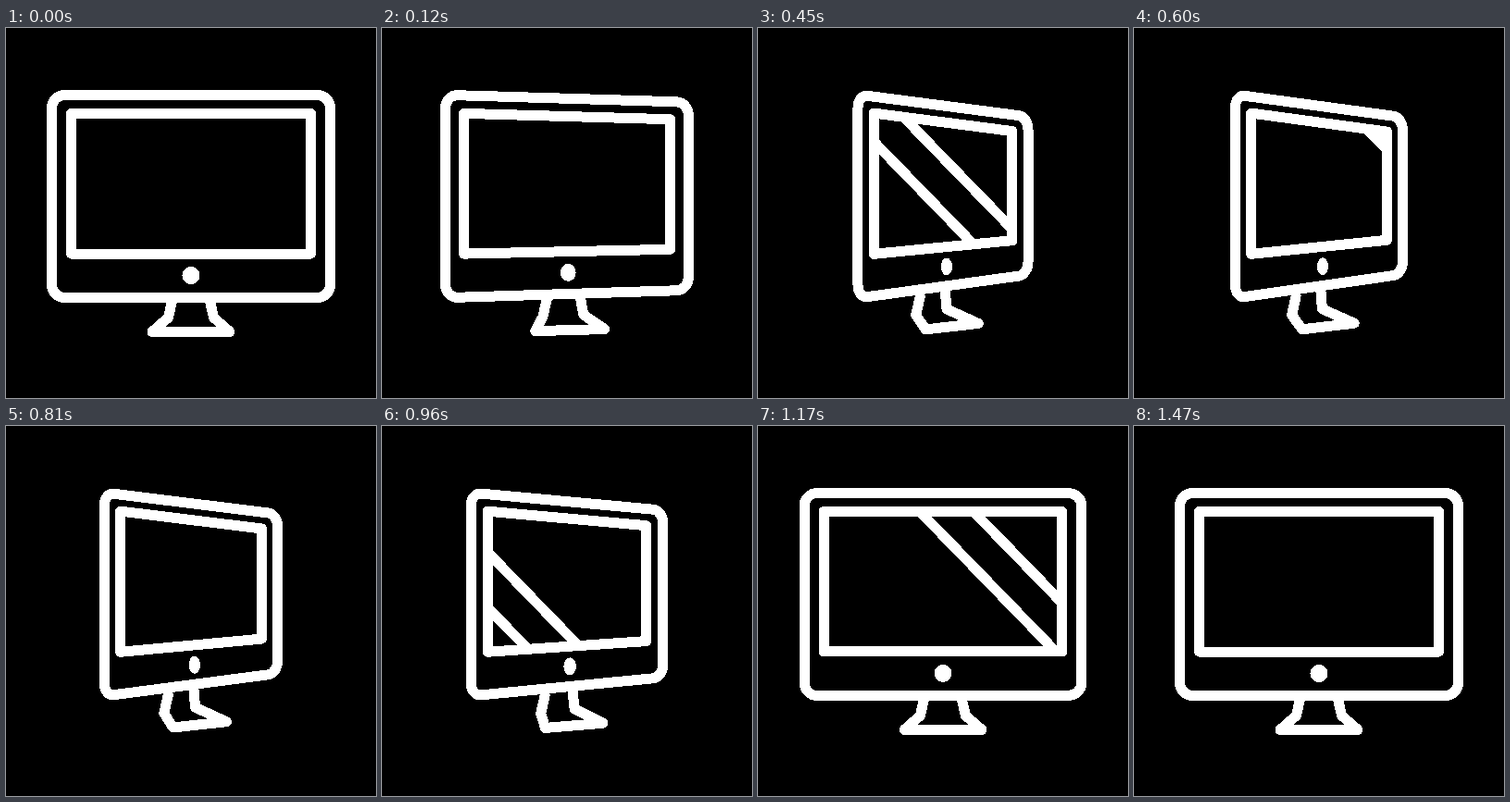
An HTML page that plays this animation: 400x400 px, repeating every 3.62 s.

```html
<!DOCTYPE html>
<html lang="en">
<head>
<meta charset="utf-8">
<title>Monitor</title>
<style>
html, body { margin: 0; width: 100%; height: 100%; overflow: hidden; background: #000; }
svg { display: block; width: 100%; height: 100%; shape-rendering: crispEdges; }
path { fill: none; stroke: #fff; stroke-width: 11; stroke-linecap: round; stroke-linejoin: round; }
</style>
</head>
<body>
<svg viewBox="0 0 400 400">
  <clipPath id="glass"><path id="glassShape"/></clipPath>
  <path id="stand"/>
  <path id="body"/>
  <path id="sheen" clip-path="url(#glass)"/>
  <path id="screen"/>
  <ellipse id="button" fill="#fff" ry="9.5"/>
</svg>
<script>
const LOOP = 3620, STEP = 30, LAST = 49, TURN = 20;
const MID = 200, HORIZON = 179;

const mix = (a, b, k) => a + (b - a) * k;
const clamp = v => Math.min(1, Math.max(0, v));
const smooth = v => v * v * (3 - 2 * v);
const poly = pts => "M" + pts.map(p => p.join(" ")).join("L");

function set(id, attrs) {
  const node = document.getElementById(id);
  for (const name in attrs) node.setAttribute(name, attrs[name]);
}

// Quick start with a long settle: cubic-bezier(1/3, 0, 0, 1).
function settle(x) {
  let lo = 0, hi = 1;
  for (let i = 0; i < 30; i++) {
    const s = (lo + hi) / 2;
    if (s * (1 - s) ** 2 + s ** 3 < x) lo = s; else hi = s;
  }
  return smooth(lo);
}

// Heights shrink to the horizon towards the far (right) side, u = 0..1.
const recede = (y, u, k) => mix(y, HORIZON, k * mix(-0.005, 0.226, u));

// Corners clockwise from the top left; the box narrows as it turns.
function box(half, turnedHalf, top, bottom, k) {
  const w = mix(half, turnedHalf, k);
  const corner = (u, y) => [MID + w * (2 * u - 1), recede(y, u, k)];
  return [corner(0, top), corner(1, top), corner(1, bottom), corner(0, bottom)];
}

function toward([ax, ay], [bx, by], d) {
  const k = d / Math.hypot(bx - ax, by - ay);
  return [mix(ax, bx, k), mix(ay, by, k)];
}

function rounded(pts, rx, ry) {
  let d = "";
  pts.forEach((p, i) => {
    const prev = pts[(i + 3) % 4], next = pts[(i + 1) % 4];
    const [before, after] = i % 2 ? [rx, ry] : [ry, rx];
    const curve = [
      toward(p, prev, before * 0.45),
      toward(p, next, after * 0.45),
      toward(p, next, after)
    ];
    d += (i ? "L" : "M") + toward(p, prev, before).join(" ") + "C" + curve.join(" ");
  });
  return d + "Z";
}

// Mirrored legs: narrower, raised and tilted when turned, the foot swinging out.
function stand(k) {
  const point = (side, half, y, swing) => [
    MID + swing * k + side * half * (1 - 0.33 * k),
    y - k * (6 + 3.3 * side)
  ];
  const leg = side => [
    point(side, 20, 293, -11.5),
    point(side, 24.5, 313, -13),
    point(side, 42, 328.5, 10)
  ];
  return poly([...leg(-1), ...leg(1).reverse()]);
}

// Diagonal pair sweeping from the lower left to the upper right.
function sweep(n, start, length) {
  const lead = mix(-185, 300, smooth(clamp((n - start) / length)));
  const x = (c, y) => c + 168 + (y - 168) * 0.97;
  return [lead, lead - 58].map(c => poly([[x(c, 0), 0], [x(c, 400), 400]])).join("");
}

function draw(time) {
  const n = Math.min(LAST, Math.floor((time % LOOP) / STEP));
  const k = settle(clamp(1 - Math.abs(n - TURN) / TURN));
  const glass = poly(box(129.5, 73.3, 92.5, 244, k)) + "Z";

  set("body", { d: rounded(box(150.5, 90.5, 72.5, 291.5, k), mix(14, 10, k), 14) });
  set("screen", { d: glass });
  set("glassShape", { d: glass });
  set("stand", { d: stand(k) });
  set("sheen", { d: sweep(n, 2.7, 24.5) + sweep(n, 20, 31) });
  set("button", {
    cx: MID + 4 * k,
    cy: recede(267.5, 0.5, k),
    rx: mix(9.5, 6, k)
  });
}

const begin = performance.now();
function tick() {
  draw(performance.now() - begin);
  requestAnimationFrame(tick);
}
tick();
</script>
</body>
</html>
```
